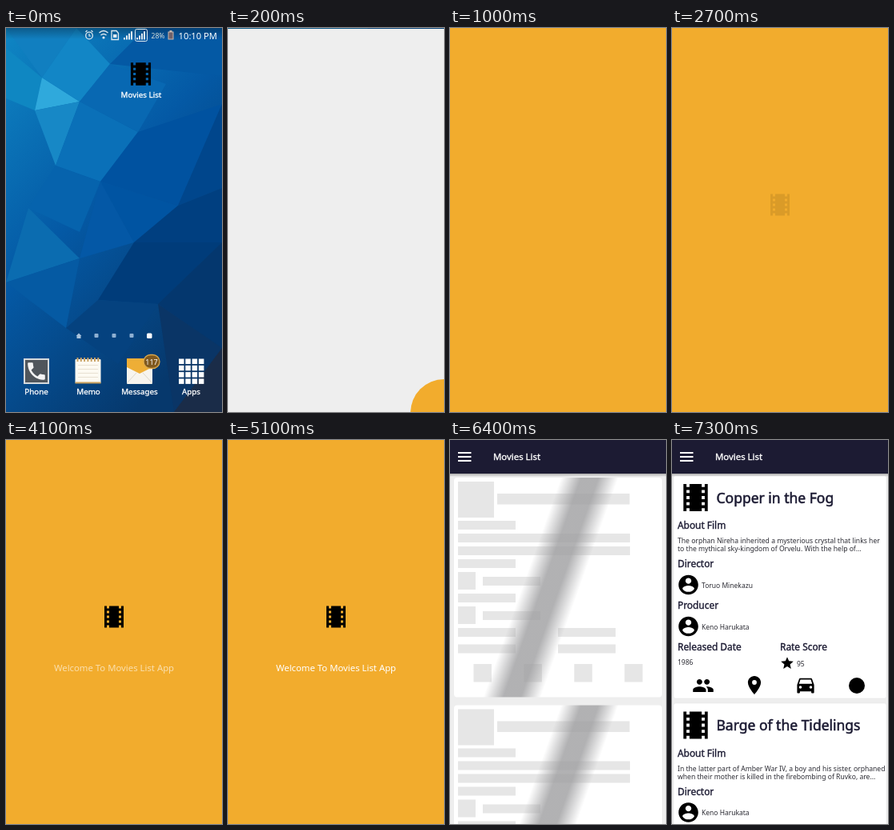
Animation of 270x480 px, one loop 8 s. Source, as an HTML page:

```html
<!DOCTYPE html>
<html lang="en">
<head>
<meta charset="utf-8">
<title>Movies List</title>
<style>
  html, body { margin: 0; width: 100%; height: 100%; overflow: hidden; background: #eee; }
  svg { display: block; width: 100vw; height: 100vh; }
  text { font-family: "Noto Sans", "Open Sans", sans-serif; white-space: pre; }
</style>
</head>
<body>
<svg id="stage" viewBox="0 0 270 480"></svg>
<script>
const LOOP = 8000, STEP = 100;
const NAVY = '#1c1b33', AMBER = '#f2ac2d', INK = '#2b2b33';

const ICONS = {
  film: 'M18 3v2h-2V3H8v2H6V3H4v18h2v-2h2v2h8v-2h2v2h2V3h-2zM8 17H6v-2h2v2zm0-4H6v-2h2v2zm0-4H6V7h2v2zm10 8h-2v-2h2v2zm0-4h-2v-2h2v2zm0-4h-2V7h2v2z',
  person: 'M12 2C6.48 2 2 6.48 2 12s4.48 10 10 10 10-4.48 10-10S17.52 2 12 2zm0 3c1.66 0 3 1.34 3 3s-1.34 3-3 3-3-1.34-3-3 1.34-3 3-3zm0 14.2c-2.5 0-4.71-1.28-6-3.22.03-1.99 4-3.08 6-3.08 1.99 0 5.97 1.09 6 3.08-1.29 1.94-3.5 3.22-6 3.22z',
  star: 'M12 17.27L18.18 21l-1.64-7.03L22 9.24l-7.19-.61L12 2 9.19 8.63 2 9.24l5.46 4.73L5.82 21z',
  pin: 'M12 2C8.13 2 5 5.13 5 9c0 5.25 7 13 7 13s7-7.75 7-13c0-3.87-3.13-7-7-7zm0 9.5a2.5 2.5 0 1 1 0-5 2.5 2.5 0 0 1 0 5z',
  people: 'M16 11c1.66 0 3-1.34 3-3s-1.34-3-3-3-3 1.34-3 3 1.34 3 3 3zm-8 0c1.66 0 3-1.34 3-3S9.66 5 8 5 5 6.34 5 8s1.34 3 3 3zm0 2c-2.33 0-7 1.17-7 3.5V19h14v-2.5c0-2.33-4.67-3.5-7-3.5zm8 0c-.29 0-.62.02-.97.05 1.16.84 1.97 1.97 1.97 3.45V19h6v-2.5c0-2.33-4.67-3.5-7-3.5z',
  car: 'M18.92 6.01C18.72 5.42 18.16 5 17.5 5h-11c-.66 0-1.21.42-1.42 1.01L3 12v8c0 .55.45 1 1 1h1c.55 0 1-.45 1-1v-1h12v1c0 .55.45 1 1 1h1c.55 0 1-.45 1-1v-8zM6.5 16a1.5 1.5 0 1 1 0-3 1.5 1.5 0 0 1 0 3zm11 0a1.5 1.5 0 1 1 0-3 1.5 1.5 0 0 1 0 3zM5 11l1.5-4.5h11L19 11z',
  phone: 'M6.62 10.79a15 15 0 0 0 6.59 6.59l2.2-2.2c.27-.27.67-.36 1.02-.24 1.12.37 2.33.57 3.57.57.55 0 1 .45 1 1V20c0 .55-.45 1-1 1C10.6 21 3 13.4 3 4c0-.55.45-1 1-1h3.5c.55 0 1 .45 1 1 0 1.25.2 2.45.57 3.57.11.35.03.74-.25 1.02z'
};

const rect = (x, y, w, h, fill, extra = '') =>
  `<rect x="${x}" y="${y}" width="${w}" height="${h}" fill="${fill}" ${extra}/>`;
const text = (x, y, size, str, fill = NAVY, extra = '') =>
  `<text x="${x}" y="${y}" font-size="${size}" fill="${fill}" ${extra}>${str}</text>`;
// Medium weight: regular glyphs thickened by a thin outline
const medium = (x, y, size, str, fill = NAVY, extra = '') =>
  text(x, y, size, str, fill, `stroke="${fill}" stroke-width="${size / 32}" ${extra}`);
const line = (d, stroke, width = 1, fill = 'none') =>
  `<path d="${d}" stroke="${stroke}" stroke-width="${width}" fill="${fill}"/>`;
// Centres a 24-unit icon on (x, y)
const icon = (name, x, y, scale, fill = '#000') =>
  `<path d="${ICONS[name]}" fill="${fill}" transform="translate(${x} ${y}) scale(${scale}) translate(-12 -12)"/>`;
const group = (id, body) => `<g id="${id}">${body}</g>`;
const range = n => [...Array(n).keys()];
const MID = 'text-anchor="middle"';

function wallpaper() {
  const facets = [
    '#117fc0 0,0 88,0 45,62',
    '#0f87c2 0,25 45,62 36,103 0,88',
    '#2fa9dc 45,62 92,92 36,103',
    '#1286c6 88,0 130,45 92,92 45,62',
    '#0459a4 175,0 270,0 270,60 130,45',
    '#1788c6 36,103 92,92 62,172',
    '#0a70b8 92,92 165,130 118,192 62,172',
    '#0868b2 92,92 130,45 200,70 165,130',
    '#0052a0 165,130 270,95 215,222 118,192',
    '#00468c 270,95 270,200 215,222',
    '#0663ad 62,172 118,192 92,255 28,225',
    '#0054a2 118,192 215,222 160,268',
    '#0458a6 118,192 160,268 92,288',
    '#0b6cb0 28,225 92,288 0,318',
    '#003f80 215,222 270,200 270,268 160,268',
    '#003c7a 160,268 270,268 190,345 115,340',
    '#055aa3 0,318 92,288 75,375',
    '#04376e 190,345 270,268 270,400',
    '#05427f 75,375 115,340 190,345 140,420',
    '#0a3566 190,345 270,400 210,480',
    '#1a2c48 270,400 270,480 210,480'
  ];
  return rect(0, 0, 270, 480, 'url(#sky)') + facets.map(f => {
    const cut = f.indexOf(' ');
    return `<polygon fill="${f.slice(0, cut)}" points="${f.slice(cut + 1)}"/>`;
  }).join('');
}

function statusBar() {
  const pale = '#e0e9f0';
  const bars = x => range(4).map(i => rect(x + i * 3, 12 - i * 2.6, 2, 2.5 + i * 2.6, pale)).join('');
  return rect(0, 0, 270, 14, 'url(#shade)')
    + `<circle cx="104" cy="9.5" r="4.3" fill="none" stroke="${pale}" stroke-width="1.3"/>`
    + line('M104 7v3h2M99.5 5l2-2M108.5 5l-2-2', pale, 1.2)
    + line('M116.5 6q5.5-5 11 0M118.5 9q3.5-3 7 0', pale, 1.4)
    + `<circle cx="122" cy="12" r="1.6" fill="${pale}"/>`
    + line('M132 3.5h6l2.500 3v8h-8.500z', pale, 1.3) + rect(134, 8, 4.5, 4, pale)
    + bars(147) + bars(163) + rect(161.5, 1.5, 15, 15, 'none', `rx="2" stroke="${pale}"`)
    + text(181.5, 13, 8.6, '28%', '#d8dcd8')
    + rect(203, 5, 6, 9, '#70616a', 'stroke="#c9b8ae"') + rect(204.5, 3, 3, 2, '#c9b8ae')
    + text(264, 14, 11.2, '10:10 PM', '#fff', 'text-anchor="end"');
}

function dock() {
  const label = (x, str) => medium(x, 458, 9.8, str, '#fff', MID);
  const phone = rect(23, 414, 30, 30, '#50565c', 'stroke="#d5d9dc" stroke-width="2"')
    + icon('phone', 38, 429, 1.2, '#f3f3f3');
  const memo = rect(86.5, 414, 32, 30, '#fdfaf2', 'rx="1"') + rect(86.5, 442.5, 32, 2, '#c9a05c')
    + range(4).map(i => rect(90, 421 + i * 5, 25, 1, '#e8e1d2')).join('')
    + range(7).map(i => rect(88.5 + i * 4.3, 412, 2, 5, '#c9a365')).join('');
  const mail = rect(151, 413, 32, 32, '#f7f4ee', 'rx="1"')
    + '<path d="M151 413h32v11l-16 8-16-8z" fill="#eeae36"/>' + line('M151 444l12-13M183 444l-12-13', '#dcd7cc')
    + rect(172, 408.5, 20, 17, '#80591f', 'rx="8.5" stroke="#dca94b" stroke-width="1.3"')
    + text(182, 420.5, 9, '117', '#fff', MID);
  const apps = range(16).map(i => rect(216 + i % 4 * 8.3, 413.5 + (i >> 2) * 8.3, 6.5, 6.5, '#fff')).join('');
  return phone + memo + mail + apps
    + label(38, 'Phone') + label(103, 'Memo') + label(167, 'Messages') + label(231.5, 'Apps');
}

function home() {
  const dots = '<path d="M87.5 385l3.5-3.5 3.5 3.5h-1v3h-5v-3z" fill="#a9c3dc"/>'
    + range(3).map(i => rect(110.5 + i * 22, 382, 5, 5, '#8fb0d2', 'rx="1"')).join('')
    + rect(176, 381.5, 6.5, 6.5, '#fff', 'rx="1.5"');
  return wallpaper() + statusBar() + icon('film', 168.5, 57.5, 1.57)
    + medium(169, 87, 9.8, 'Movies List', '#fff', MID) + dots + dock();
}

function splash() {
  return rect(0, 0, 270, 480, '#eee')
    + `<circle id="reveal" cx="270" cy="480" fill="${AMBER}"/>`
    + group('logo', icon('film', 135, 221, 1.5))
    + group('welcome', text(135, 289, 11.35, 'Welcome To Movies List App', '#fff', MID));
}

function skeleton() {
  const bar = (x, y, w = 72, h = 11) => rect(x, y, w, h, '#e6e6e6');
  return rect(5, 47, 260, 274.5, '#fff', 'rx="4"')
    + bar(10, 52, 45, 45) + bar(59, 67, 165.5, 13.5)
    + bar(10, 101) + bar(10, 117, 215) + bar(10, 133, 215) + bar(10, 149)
    + bar(10, 165, 22, 22) + bar(41, 171) + bar(10, 192) + bar(10, 208, 22, 22) + bar(41, 214)
    + [235, 255.5].map(y => bar(10, y) + bar(135, y)).join('')
    + range(4).map(i => bar(29.5 + i * 62.9, 280, 22.5, 22.5)).join('')
    + `<g clip-path="url(#card)">${rect(-36, -160, 72, 320, 'url(#glow)', 'class="shimmer"')}</g>`;
}

function film(f) {
  const head = (x, y, str) => medium(x, y, 11.9, str);
  const person = (y, name) => icon('person', 20.5, y, 1.23) + text(37, y + 3.5, 8.5, name, INK);
  return rect(2, 44.5, 266, 278.5, '#fff', 'rx="2.5" stroke="#e2e2e2" stroke-width=".5"')
    + icon('film', 29.5, 72, 1.9) + medium(55.5, 78.5, 17.5, f.title)
    + head(7, 111, 'About Film')
    + f.about.map((s, i) => text(7, 129 + i * 10, 8.6, s, INK)).join('')
    + head(7, 159, 'Director') + person(181, f.director)
    + head(7, 211, 'Producer') + person(233, f.producer)
    + head(7, 263, 'Released Date') + text(7, 281, 8.5, f.year, INK)
    + head(135, 263, 'Rate Score') + icon('star', 144, 279, .78) + text(156, 282.5, 8.5, f.score, INK)
    + icon('people', 39, 307, 1.16) + icon('pin', 103, 306.5, 1.16) + icon('car', 167, 306, 1.18)
    + '<circle cx="231" cy="307" r="10" fill="#000"/>';
}

const FILMS = [
  { title: 'Copper in the Fog', director: 'Toruo Minekazu', producer: 'Keno Harukata', year: '1986', score: '95',
    about: ['The orphan Nireha inherited a mysterious crystal that links her',
            'to the mythical sky-kingdom of Orvelu. With the help of...'] },
  { title: 'Barge of the Tidelings', director: 'Keno Harukata', producer: 'Toruo Minekazu', year: '1988', score: '97',
    about: ['In the latter part of Amber War IV, a boy and his sister, orphaned',
            'when their mother is killed in the firebombing of Ruvko, are...'] }
];

function list() {
  const stack = draw => FILMS.map((f, i) => `<g transform="translate(0 ${i * 284.5})">${draw(f)}</g>`).join('');
  const menu = range(3).map(i => rect(10, 15 + i * 5, 16.5, 2, '#fff')).join('');
  return rect(0, 0, 270, 480, '#eee')
    + group('loading', stack(skeleton)) + group('films', stack(film))
    + rect(0, 42, 270, 4, 'url(#shade)')
    + group('plainBar', rect(0, 0, 270, 42, '#16264d') + text(12, 27, 14.6, 'Movies List', '#000'))
    + group('bar', rect(0, 0, 270, 42, NAVY) + menu + medium(54, 25, 11.4, 'Movies List', '#fff'));
}

const stop = (at, color, alpha = 1) => `<stop offset="${at}" stop-color="${color}" stop-opacity="${alpha}"/>`;
const stage = document.getElementById('stage');
stage.innerHTML = `<defs>
  <linearGradient id="sky" x2=".6" y2="1">${stop(0, '#0f86c4')}${stop(.5, '#0459a5')}${stop(1, '#06386c')}</linearGradient>
  <linearGradient id="glow">${stop(0, '#9e9ea0', 0)}${stop(.35, '#9e9ea0', .8)}${stop(.65, '#9e9ea0', .8)}${stop(1, '#9e9ea0', 0)}</linearGradient>
  <linearGradient id="shade" x2="0" y2="1">${stop(0, '#000', .28)}${stop(1, '#000', 0)}</linearGradient>
  <clipPath id="card"><rect x="5" y="47" width="260" height="274.5" rx="4"/></clipPath>
</defs>` + group('home', home()) + group('splash', splash()) + group('list', list());

const el = id => document.getElementById(id);
const shimmers = stage.querySelectorAll('.shimmer');
const show = (node, on) => node.setAttribute('display', on ? 'inline' : 'none');
const place = (node, y, alpha) => {
  node.setAttribute('transform', `translate(0 ${y})`);
  node.setAttribute('opacity', alpha);
};
const progress = (t, start, length) => Math.min(1, Math.max(0, (t - start) / length));
const smooth = p => (1 - Math.cos(Math.PI * p)) / 2;

// Window opening: slides up 8% of the height while fading in
function openWindow(node, t, start) {
  const y = 38.4 * (1 - progress(t, start, 350)) ** 5;
  const alpha = 1 - (1 - progress(t, start, 200)) ** 4;
  place(node, y, alpha);
}

function render(t) {
  show(el('splash'), t >= 100);
  openWindow(el('splash'), t, 18);
  el('reveal').setAttribute('r', 720 * smooth(progress(t, -33, 1502)));
  el('logo').setAttribute('opacity', smooth(progress(t, 2500, 1000)));
  el('welcome').setAttribute('opacity', smooth(progress(t, 3530, 1000)));

  show(el('list'), t >= 5800);
  if (t < 5900) place(el('list'), 30, .3);
  else openWindow(el('list'), t, 5837);
  show(el('plainBar'), t < 6000);
  show(el('bar'), t >= 6000);
  show(el('loading'), t < 7300);
  show(el('films'), t >= 7300);

  const x = -60 + 410 * (1 - (1 - progress(t, 6200, 700)) ** 1.8);
  for (const s of shimmers) {
    show(s, t >= 6300 && t < 6900);
    s.setAttribute('transform', `translate(${x} 184) skewX(-19.5)`);
  }
}

const begin = performance.now();
function tick() {
  const t = (performance.now() - begin) % LOOP;
  render(Math.floor(t / STEP) * STEP);
  requestAnimationFrame(tick);
}
tick();
</script>
</body>
</html>
```
